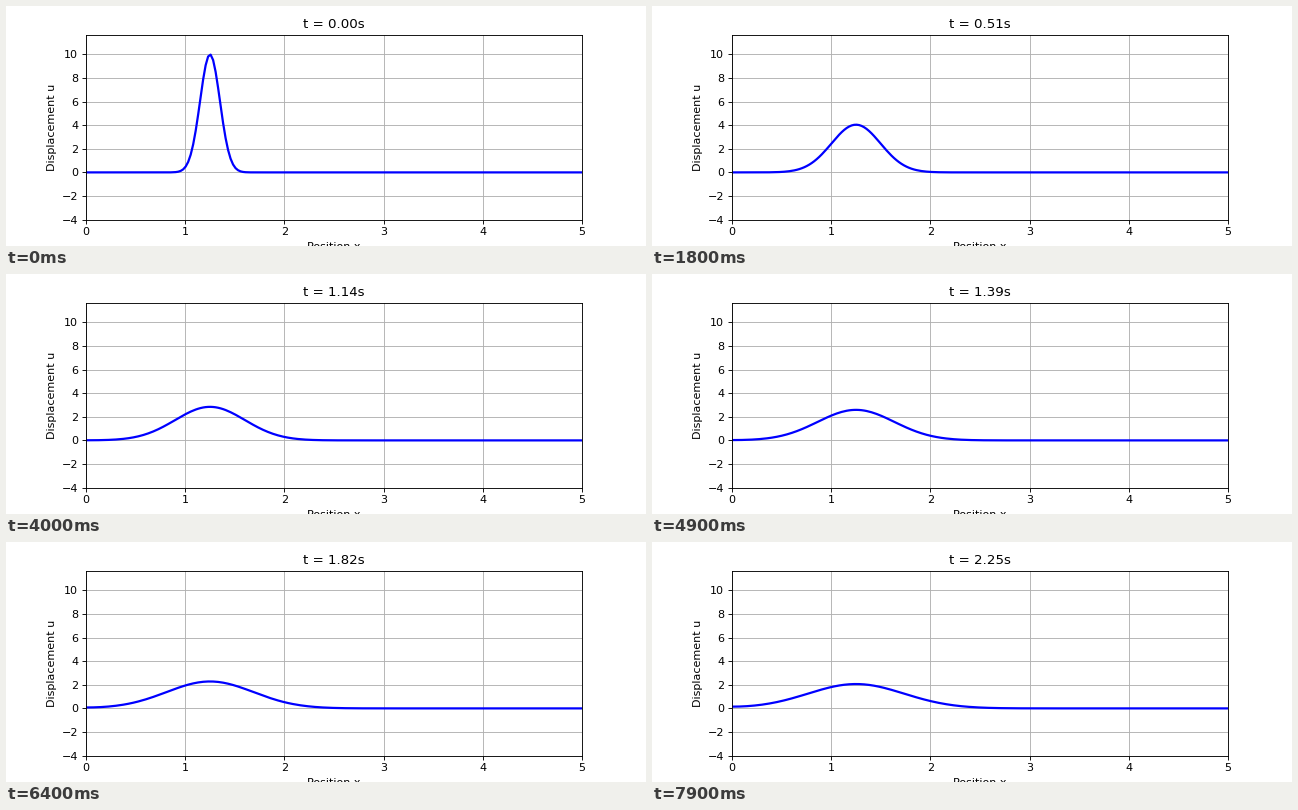
Write a matplotlib script that moves like this. It is 640 px wide and 240 px high and loops after 8000 ms.

```python
import matplotlib.pyplot as plt
import numpy as np
from matplotlib.animation import FuncAnimation

LENGTH = 5.0
CENTER = 1.25
PEAK = 10.0
WIDTH = 0.1
DIFFUSIVITY = 0.05
DT = 0.02844
FRAMES = 80

x = np.linspace(0, LENGTH, 200)


def displacement(t):
    """Spreading Gaussian with insulated ends, using mirror images."""
    var = WIDTH**2 + 2 * DIFFUSIVITY * t
    images = (CENTER, -CENTER, 2 * LENGTH - CENTER)
    total = sum(np.exp(-((x - c) ** 2) / (2 * var)) for c in images)
    return PEAK * WIDTH / np.sqrt(var) * total


plt.rcParams["font.family"] = "DejaVu Sans"
fig, ax = plt.subplots(figsize=(8, 3), dpi=80)
line, = ax.plot(x, displacement(0), color="blue", lw=2)
ax.set_xlim(0, LENGTH)
ax.set_ylim(-4, 11.66)
ax.set_yticks(range(-4, 11, 2))
ax.set_xlabel("Position x")
ax.set_ylabel("Displacement u")
title = ax.set_title("t = 0.00s")
ax.grid(True)


def update(i):
    t = i * DT
    line.set_ydata(displacement(t))
    title.set_text(f"t = {t:.2f}s")
    return line, title


anim = FuncAnimation(fig, update, frames=FRAMES, interval=100,
                     repeat=True, repeat_delay=0, blit=False)
plt.show()
```
